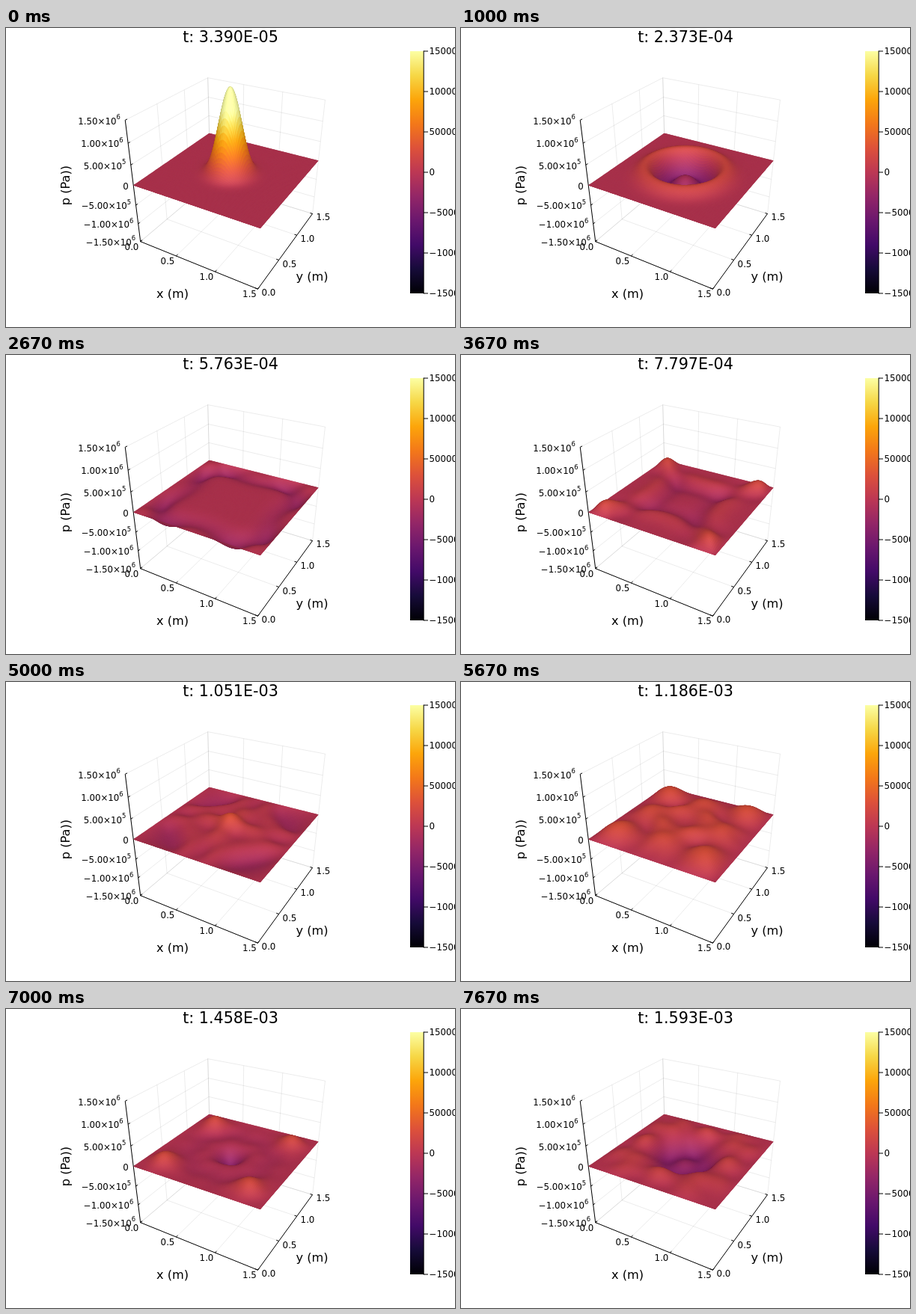
These frames come from a looping animation (600 px wide and 400 px high, 8 s). An HTML page with a canvas:

```html
<!DOCTYPE html>
<html>
<head>
<meta charset="utf-8">
<style>
html, body { margin: 0; width: 100%; height: 100%; overflow: hidden; background: #fff; }
canvas { display: block; }
</style>
</head>
<body>
<canvas id="stage" width="600" height="400"></canvas>
<script>
const ctx = document.getElementById("stage").getContext("2d");
const N = 100, HALF = N / 2;       // surface cells per side
const SIDE = 1.5, SPEED = 1490;    // metres, metres per second
const SIGMA = 0.105, PEAK = 1.94;  // initial Gaussian: width, height in units of 1.5e6 Pa
const REACH = 4.5 * SIGMA;
const FRAMES = 24, LOOP = 8000;
const INFERNO = [[0, 0, 4], [22, 11, 57], [66, 10, 104], [106, 23, 110], [147, 38, 103], [188, 55, 84],
  [221, 81, 58], [243, 120, 25], [252, 165, 10], [246, 215, 70], [252, 255, 164]];
const TICKS = [-1, -1 / 3, 1 / 3, 1];

// Perspective view of the cube [-1, 1]^3
function project(x, y, z) {
  const s = 604 / (6.692 - 0.433 * x + 0.75 * y - 0.5 * z);
  return [299.7 + s * (0.866 * x + 0.5 * y), 193.5 - s * (-0.25 * x + 0.433 * y + 0.866 * z)];
}

function line(a, b, color) {
  ctx.strokeStyle = color;
  ctx.lineWidth = 1;
  ctx.beginPath();
  ctx.moveTo(...a);
  ctx.lineTo(...b);
  ctx.stroke();
}

function line3(a, b, color) { line(project(...a), project(...b), color); }

// y is the middle of the digits
function text(str, x, y, size = 11.8, align = "center") {
  ctx.font = size + 'px "DejaVu Sans", sans-serif';
  ctx.textAlign = align;
  ctx.fillStyle = "#000";
  ctx.fillText(str, x, y + size * 0.365);
  return ctx.measureText(str).width;
}

// Spherical wave from a Gaussian pulse, r metres away after travelling d metres
function pulse(r, d) {
  const part = s => s * Math.exp(-s * s / (2 * SIGMA * SIGMA));
  return PEAK * (part(r - d) + part(r + d)) / (2 * r);
}

// Mid-plane of a cube with zero-pressure walls, as a sum of mirrored sources
function pressure(x, y, d) {
  let sum = 0;
  for (let m = -2; m <= 2; m++)
    for (let n = -2; n <= 2; n++)
      for (let k = 0; k < 2; k++) {
        const r = Math.max(1e-4, Math.hypot(x - SIDE * m, y - SIDE * n, SIDE * k));
        if (Math.abs(r - d) > REACH) continue;
        sum += ((m + n + k) % 2 ? -1 : 1) * (k ? 2 : 1) * pulse(r, d);
      }
  return sum;
}

function heights(d) {
  const h = Array.from({ length: N + 1 }, () => new Float64Array(N + 1));
  for (let i = 1; i <= HALF; i++)
    for (let j = 1; j <= i; j++) {
      const v = pressure(SIDE * (i / N - 0.5), SIDE * (j / N - 0.5), d);
      for (const [a, b] of [[i, j], [j, i]])
        h[a][b] = h[N - a][b] = h[a][N - b] = h[N - a][N - b] = v;
    }
  return h;
}

function shade(z, zx, zy) {
  const v = Math.min(0.9999, Math.max(0, 0.5 + z / 2)) * 10;
  const i = Math.floor(v);
  const facing = Math.max(0, (0.5 - 0.433 * zx + 0.75 * zy) / Math.hypot(zx, zy, 1));
  const rgb = INFERNO[i].map((c, k) =>
    Math.min(255, (c + (INFERNO[i + 1][k] - c) * (v - i)) * (0.76 + 0.25 * facing) + 18 * facing ** 6));
  return `rgb(${rgb.map(Math.round)})`;
}

// Painted from back to front; each cell runs on under its nearer neighbours to hide seams
function drawSurface(h) {
  const at = i => 2 * i / N - 1;
  const pts = h.map((row, i) => Array.from(row, (z, j) => project(at(i), at(j), z)));
  ctx.save();
  ctx.translate(0, -0.4);
  for (let i = 0; i < N; i++)
    for (let j = N - 1; j >= 0; j--) {
      const a = h[i][j], b = h[i + 1][j], c = h[i + 1][j + 1], e = h[i][j + 1];
      const near = Math.min(i + 2, N), low = Math.max(j - 1, 0);
      ctx.fillStyle = shade((a + b + c + e) / 4, (b + c - a - e) * N / 4, (c + e - a - b) * N / 4);
      ctx.beginPath();
      ctx.moveTo(...pts[i][low]);
      ctx.lineTo(...pts[near][low]);
      ctx.lineTo(...pts[near][j + 1]);
      ctx.lineTo(...pts[i][j + 1]);
      ctx.fill();
    }
  ctx.restore();
}

function drawAxes() {
  const grid = "rgba(0,0,0,0.08)", len = 0.04;
  for (const v of TICKS) {
    line3([v, -1, -1], [v, 1, -1], grid);
    line3([-1, v, -1], [1, v, -1], grid);
    line3([v, 1, -1], [v, 1, 1], grid);
    line3([-1, v, -1], [-1, v, 1], grid);
  }
  for (let k = -3; k <= 3; k++) {
    line3([-1, -1, k / 3], [-1, 1, k / 3], grid);
    line3([-1, 1, k / 3], [1, 1, k / 3], grid);
  }
  line3([-1, -1, -1], [-1, -1, 1], "#000");
  line3([-1, -1, -1], [1, -1, -1], "#000");
  line3([1, -1, -1], [1, 1, -1], "#000");
  for (const v of TICKS) {
    line3([v, -1, -1], [v, -1 + len, -1], "#000");
    line3([1, v, -1], [1 - len, v, -1], "#000");
  }
  const xSpots = [[168, 293], [216, 312], [268, 333], [325.5, 356]];
  const ySpots = [[351, 354], [379, 316], [403, 282], [424, 252.5]];
  TICKS.forEach((_, i) => {
    const label = (i / 2).toFixed(1);
    text(label, ...xSpots[i]);
    text(label, ...ySpots[i]);
  });
  for (let k = -3; k <= 3; k++) {
    line3([-1, -1, k / 3], [-1, -1 + len, k / 3], "#000");
    let [x, y] = project(-1, -1, k / 3);
    x -= 6.5;
    y += 1;
    if (k) {
      const small = Math.abs(k) === 1;
      x -= text(small ? "5" : "6", x, y - 5.5, 8.4, "right");
      const mantissa = (small ? 5 : Math.abs(k) / 2).toFixed(2);
      text((k < 0 ? "−" : "") + mantissa + "×10", x, y, 11.8, "right");
    } else text("0", x, y, 11.8, "right");
  }
  text("x (m)", 222.5, 355, 16.2);
  text("y (m)", 409, 332.5, 16.2);
  ctx.save();
  ctx.translate(79, 210.5);
  ctx.rotate(-Math.PI / 2);
  text("p (Pa))", 0, 0, 16.2);
  ctx.restore();
}

function drawColorbar() {
  const top = 31, bottom = 355;
  const fill = ctx.createLinearGradient(0, bottom, 0, top);
  INFERNO.forEach((c, i) => fill.addColorStop(i / 10, `rgb(${c})`));
  ctx.fillStyle = fill;
  ctx.fillRect(540, top, 18, bottom - top);
  line([558.2, top - 0.5], [558.2, bottom + 0.5], "#000");
  for (let k = -3; k <= 3; k++) {
    const y = 193 - 54 * k;
    line([558, y], [564, y], "#000");
    text(String(k * 500000).replace("-", "−"), 565.5, y, 11.8, "left");
  }
}

function draw(n) {
  const time = 3.38983e-5 * (2 * n + 1);
  ctx.fillStyle = "#fff";
  ctx.fillRect(0, 0, 600, 400);
  drawAxes();
  drawColorbar();
  drawSurface(heights(SPEED * time));
  text("t: " + time.toExponential(3).replace("e-", "E-0"), 300, 11, 20.7);
}

let start, shown = -1;
function tick(now) {
  start ??= now;
  const t = (now - start) % LOOP;
  let n = FRAMES - 1;
  while (n > 0 && Math.round(n * 100 / 3) * 10 > t) n--;
  if (n !== shown) draw(shown = n);
  requestAnimationFrame(tick);
}
requestAnimationFrame(tick);
</script>
</body>
</html>
```
